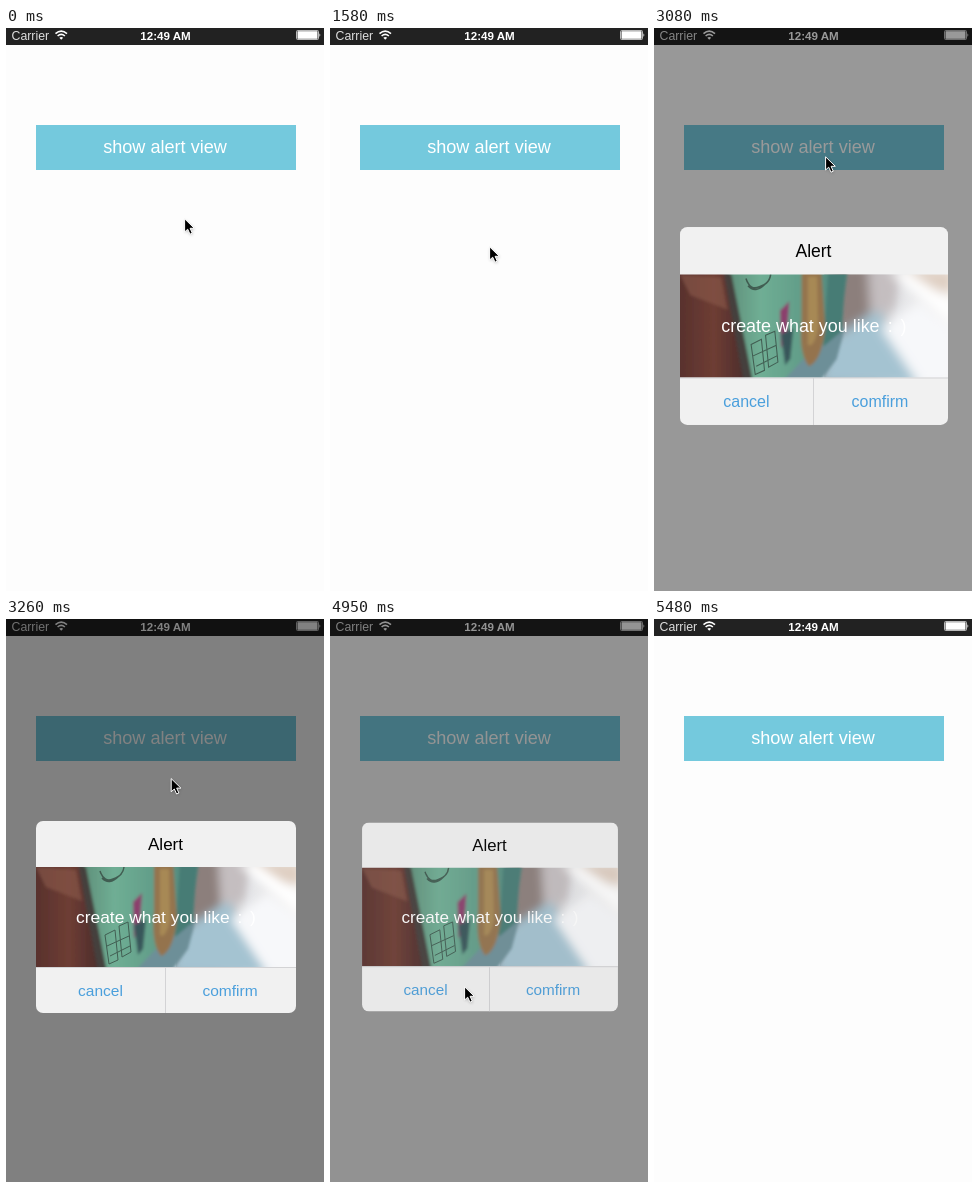
An HTML page that plays this animation: 318 by 563 pixels, repeating every 5.94 s.

```html
<!DOCTYPE html>
<html lang="en">
<head>
<meta charset="utf-8">
<title>Alert view</title>
<style>
  html, body { margin: 0; width: 100%; height: 100%; overflow: hidden; background: #fdfdfd; }
  svg { display: block; width: 100%; height: 100%; }
  text { font-family: "Liberation Sans", Arial, sans-serif; }
  .mid { text-anchor: middle; }
  .link { font-size: 15.5px; fill: #4a9fdc; }
  .over { font-size: 17.4px; fill: #fff; }
</style>
</head>
<body>
<svg viewBox="0 0 318 563">
  <defs>
    <clipPath id="card"><rect x="30" y="202" width="260" height="192" rx="7"/></clipPath>
    <clipPath id="pic"><rect x="30" y="248" width="260" height="100"/></clipPath>
    <filter id="soft" x="-50%" y="-50%" width="200%" height="200%"><feGaussianBlur stdDeviation="5"/></filter>
    <filter id="hazy" x="-50%" y="-50%" width="200%" height="200%"><feGaussianBlur stdDeviation="1.6"/></filter>
    <linearGradient id="wood">
      <stop offset="0" stop-color="#55302c"/><stop offset=".55" stop-color="#6e3d34"/><stop offset="1" stop-color="#4b2c2b"/>
    </linearGradient>
    <linearGradient id="board">
      <stop offset="0" stop-color="#5d8a76"/><stop offset=".3" stop-color="#6fae94"/>
      <stop offset=".65" stop-color="#619c88"/><stop offset="1" stop-color="#4d8179"/>
    </linearGradient>
    <linearGradient id="glow">
      <stop offset="0" stop-color="#8f8c8c"/><stop offset=".35" stop-color="#b3aeae"/>
      <stop offset=".6" stop-color="#e4e5e8"/><stop offset="1" stop-color="#f6f4f2"/>
    </linearGradient>
  </defs>

  <rect width="318" height="563" fill="#fdfdfd"/>
  <rect width="318" height="17" fill="#222"/>
  <g fill="#fff">
    <text x="5.5" y="12" font-size="12.3" fill="#ddd">Carrier</text>
    <text class="mid" x="159.5" y="12" font-size="11.6" font-weight="bold">12:49 AM</text>
    <g fill="none" stroke="#fff" stroke-width="1.6">
      <path d="M49.5 5.6Q55.2 .7 61 5.6M51.6 8Q55.2 4.9 58.9 8"/>
    </g>
    <path d="M53.3 9.7Q55.2 8.2 57.2 9.7L55.2 11.8Z"/>
    <rect x="290.5" y="2.5" width="22" height="9" rx="1" fill="none" stroke="#bbb"/>
    <rect x="291.5" y="3.2" width="20" height="7.6"/>
    <path d="M313.5 5.3Q315.3 7 313.5 8.9Z"/>
    <rect x="30" y="97" width="260" height="45" fill="#74c9dd"/>
    <text class="mid" x="159" y="125" font-size="18.1">show alert view</text>
  </g>

  <rect id="dim" width="318" height="563"/>

  <g id="alert"><g clip-path="url(#card)">
    <rect x="30" y="202" width="260" height="192" fill="#f1f1f1"/>
    <text class="mid" x="159.5" y="231" font-size="17">Alert</text>
    <g clip-path="url(#pic)">
      <rect x="30" y="248" width="260" height="100" fill="#eeeff0"/>
      <rect x="170" y="248" width="120" height="100" fill="url(#glow)"/>
      <g filter="url(#soft)">
        <path d="M178 240H213L222 275L198 310L182 300Z" fill="#8c7f7c"/>
        <path d="M212 240H245L238 280L215 290Z" fill="#c4bec0"/>
        <path d="M175 312L222 282L266 355H165Z" fill="#a4c3d1"/>
        <path d="M225 300L262 275L295 300V355H262Z" fill="#f7f8fa"/>
        <path d="M246 244H295V266L262 262Z" fill="#dfcfc2"/>
        <path d="M232 245L295 295V275L250 245Z" fill="#fff"/>
      </g>
      <g filter="url(#hazy)">
        <path d="M25 243H82L94 353H25Z" fill="url(#wood)"/>
        <path d="M30 248L70 251L76 282L40 268Z" fill="#8b5b4c" opacity=".6"/>
        <path d="M72 243L97 353H134L182 320L193 243Z" fill="url(#board)"/>
        <path d="M72 243L80 248L101 353H92Z" fill="#44413c"/>
        <path d="M128 353L150 330L190 300L182 330L165 353Z" fill="#6d8f98"/>
        <path d="M174 243H191L187 303L169 318Z" fill="#477c75"/>
        <path d="M148 246L167 243L171 300Q167 333 155 337Q145 325 148 292Z" fill="#94734d"/>
        <path d="M154 250L163 250L164 300Q160 320 154 316Z" fill="#a78955"/>
        <path d="M127 283L136 274L134 304L128 320Z" fill="#8b3f6d"/>
        <path d="M128 306L140 300L137 330L132 336Z" fill="#38565a"/>
      </g>
      <g fill="none" stroke="#33443d" stroke-width="1.5" opacity=".75">
        <path d="M94 252Q98 264 107 260Q117 257 118 248M96 259Q103 267 113 257"/>
        <path d="M99 316l10 -5l3 30l-9 4zM113 307l9 -4l3 30l-9 5zM101 327l22 -10M104 337l20 -10" stroke-width="1"/>
      </g>
      <text class="over" x="70" y="304">create what you like</text>
      <text class="over" x="231.5" y="304">:</text>
      <text class="over" x="244" y="304">)</text>
    </g>
    <path d="M30 348.5H290M159.5 349V394" stroke="#d3d3d5" fill="none"/>
    <text class="link mid" x="94.5" y="377">cancel</text>
    <text class="link mid" x="224" y="377">comfirm</text>
  </g></g>

  <g id="cursor">
    <path d="M1 2V15L4 12.4L6.3 17.2L8.8 16.2L6.8 11.6H11Z" fill="#000" opacity=".25" filter="url(#hazy)"/>
    <path d="M.6 .8V14L3.7 11.2L6 16.2L8.3 15.2L6.1 10.3H10.3Z" stroke="#fff" stroke-width="1"/>
  </g>
</svg>
<script>
  const LOOP = 5940;
  const OPEN = [3080, 3610, 7], CLOSE = [4950, 5480, 7];
  const [dim, card, cursor] = ["dim", "alert", "cursor"].map(id => document.getElementById(id));

  // Cursor strokes: [start, end, steps], then the points passed through.
  const strokes = [
    [[360, 620, 4], [178, 190], [178, 147]],
    [[800, 970, 3], [178, 147], [178, 128]],
    [[1240, 1760, 7], [178, 128], [176, 150], [169, 200], [162, 237], [159, 233], [159, 218], [161, 188], [163, 160]],
    [[1850, 2270, 6], [163, 160], [171, 128]],
    [[3230, 3610, 5], [171, 128], [155, 205], [134, 316]],
    [[3700, 4050, 5], [134, 316], [134, 367]],
    [[5215, 5480, 4], [134, 367], [180, 440], [255, 568]]
  ];

  // Steps taken so far; the first one falls on the start time.
  function stepsAt(t, [start, end, n]) {
    const k = Math.floor((t - start) / (end - start) * (n - 1) + 0.1) + 1;
    return t < start ? 0 : Math.min(n, k);
  }

  function along(points, u) {
    const s = u * (points.length - 1);
    const i = Math.min(Math.floor(s + 1e-6), points.length - 2);
    return points[i].map((v, axis) => v + (points[i + 1][axis] - v) * (s - i));
  }

  function cursorAt(t) {
    const [span, ...points] = strokes.filter(([span]) => t >= span[0]).pop() || strokes[0];
    return along(points, stepsAt(t, span) / span[2]);
  }

  function draw(t) {
    const opened = stepsAt(t, OPEN);
    const c = Math.min(1, stepsAt(t, CLOSE) / 4);
    const fade = c * c * (3 - 2 * c);
    const settle = opened > 2 ? 0 : 0.031 * 0.16 ** (opened - 1);
    const scale = 1 + settle - 0.1 * fade;
    const shade = opened > 3 ? 0.5 : 0.5 * (1 - 0.2 ** opened);

    dim.setAttribute("opacity", shade * (1 - fade));
    card.setAttribute("opacity", opened ? 1 - fade ** 1.35 : 0);
    card.setAttribute("transform", `translate(160 298) scale(${scale}) translate(-160 -298)`);
    cursor.setAttribute("transform", `translate(${cursorAt(t)})`);
  }

  const began = performance.now();
  function tick() {
    draw((performance.now() - began) % LOOP);
    requestAnimationFrame(tick);
  }
  tick();
</script>
</body>
</html>
```
